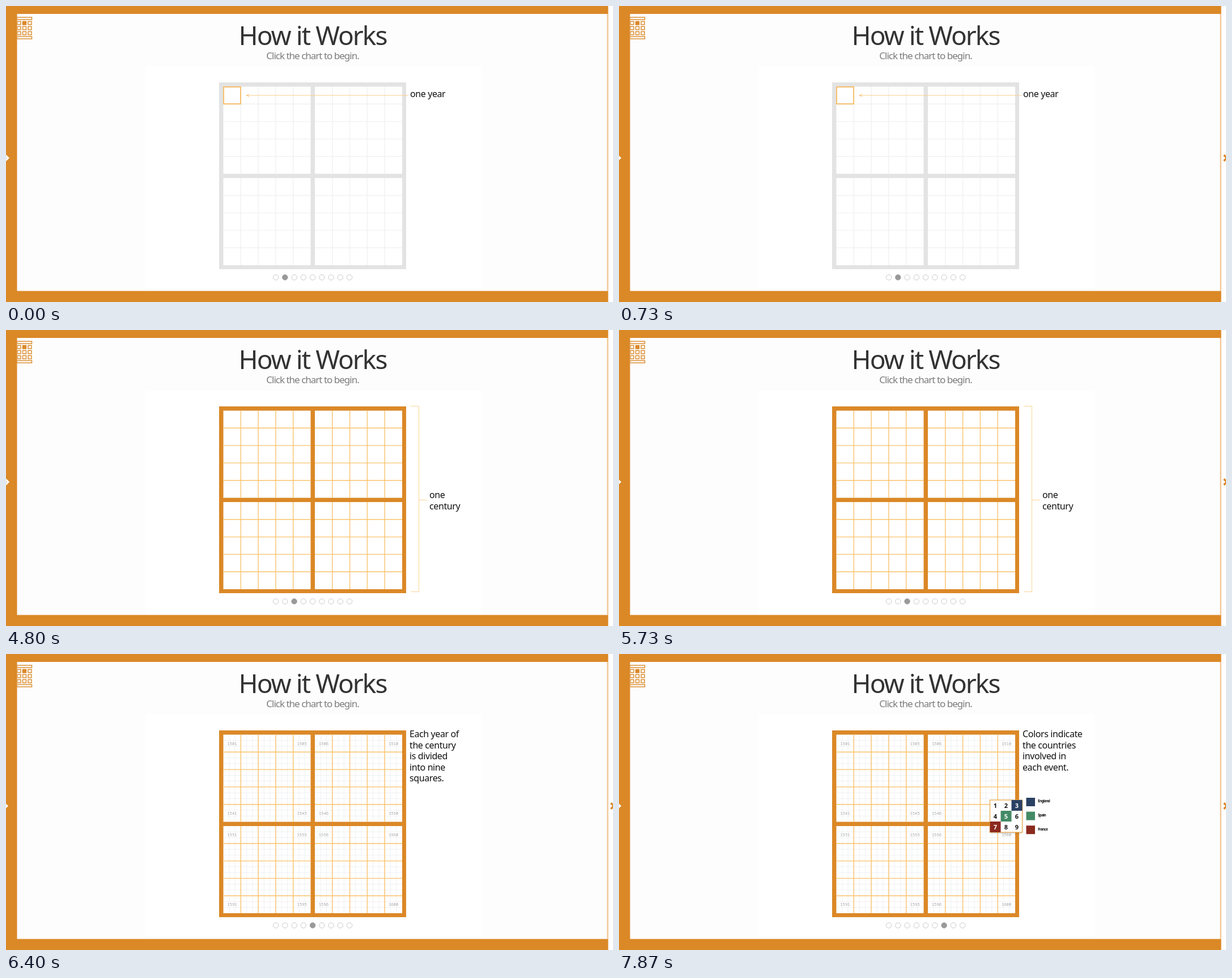
An HTML page with a canvas for the animation above (8000 ms loop, 1071 by 523 pixels).

```html
<!DOCTYPE html>
<html lang="en">
<head>
<meta charset="utf-8">
<title>How it Works</title>
<style>
  html, body { margin: 0; width: 100%; height: 100%; overflow: hidden; background: #fff; }
  canvas { display: block; width: 1071px; height: 523px; }
</style>
</head>
<body>
<canvas id="stage"></canvas>
<script>
const W = 1071, H = 523, LOOP = 8000;
const ORANGE = '#db8827', THIN = '#fac36c', GREY = '#e3e3e3', PALE = '#f1f1f1';
const SANS = '"Noto Sans", "Open Sans", sans-serif';
const MONO = '"Noto Sans Mono", "DejaVu Sans Mono", monospace';
const QUAD = 154, CELL = QUAD / 5;
const QX = [383.5, 545], QY = [142.5, 304];

const canvas = document.getElementById('stage');
const ctx = canvas.getContext('2d');
const dpr = window.devicePixelRatio || 1;
canvas.width = W * dpr;
canvas.height = H * dpr;

function rect(x, y, w, h, color) {
  ctx.fillStyle = color;
  ctx.fillRect(x, y, w, h);
}

function outline(x, y, w, h, color, weight) {
  ctx.strokeStyle = color;
  ctx.lineWidth = weight;
  ctx.strokeRect(x, y, w, h);
}

function path(points, color, weight = 1) {
  ctx.beginPath();
  points.forEach(([x, y]) => ctx.lineTo(x, y));
  ctx.strokeStyle = color;
  ctx.lineWidth = weight;
  ctx.stroke();
}

function text(str, x, y, size, { color = '#111', family = SANS, weight = 400, spacing = 0, align = 'left' } = {}) {
  ctx.font = `${weight} ${size}px ${family}`;
  ctx.letterSpacing = spacing + 'px';
  ctx.textAlign = align;
  ctx.fillStyle = color;
  ctx.fillText(str, x, y);
}

function note(lines, x, y) {
  lines.forEach((line, i) => text(line, x, y + i * 19.6, 16, { spacing: -0.4 }));
}

function chevron(x, color) {
  const y = 268.5;
  ctx.beginPath();
  [[0, -4], [4, 0], [0, 4], [2.5, 6.5], [9, 0], [2.5, -6.5]]
    .forEach(([dx, dy]) => ctx.lineTo(x + dx, y + dy));
  ctx.fillStyle = color;
  ctx.fill();
}

// Both side arrows bounce for about a second, once every five seconds.
function bounce(t) {
  const u = ((t + 330) % 5000) / 1060;
  return u < 1 ? Math.abs(Math.sin(5 * Math.PI * u)) * (1 - 0.8 * u) : 0;
}

function menuIcon() {
  ctx.save();
  ctx.beginPath();
  ctx.rect(19.5, 14, 40, 50);
  ctx.clip();
  outline(19.5, 20, 26, 4, ORANGE, 1.4);
  outline(19.5, 54, 26, 4, ORANGE, 1.4);
  for (let r = 0; r < 3; r++) {
    for (let c = 0; c < 3; c++) {
      outline(20 + c * 9.5, 27.3 + r * 9, 6, 5.6, ORANGE, 1.4);
    }
  }
  rect(29, 27, 7, 6.5, ORANGE);
  ctx.restore();
}

function frame(t) {
  rect(0, 0, W, H, '#fff');
  rect(0, 0, 1062.5, H, ORANGE);
  rect(19.5, 14, 1043, 489.5, '#fdfdfd');
  rect(1060.5, 14, 2, 489.5, '#efc590');
  menuIcon();
  text('How it Works', 541, 69, 46, { color: '#333', spacing: -2, align: 'center' });
  text('Click the chart to begin.', 541, 94, 17, { color: '#7b7b7b', spacing: -1, align: 'center' });
  const b = bounce(t);
  chevron(-5 + 2.7 * b, '#fff');
  chevron(1066 + 7 * b, ORANGE);
}

function chart(border, line, subdivided) {
  rect(376, 135, 330, 330, border);
  for (const x of QX) for (const y of QY) {
    rect(x, y, QUAD, QUAD, '#fff');
    if (subdivided) {
      for (let i = 1; i < 15; i++) {
        const d = i * CELL / 3;
        path([[x + d, y], [x + d, y + QUAD]], '#eff0f2');
        path([[x, y + d], [x + QUAD, y + d]], '#eff0f2');
      }
    }
    for (let i = 1; i < 5; i++) {
      const d = i * CELL;
      path([[x + d, y], [x + d, y + QUAD]], line, 1.4);
      path([[x, y + d], [x + QUAD, y + d]], line, 1.4);
    }
  }
}

function years() {
  QY.forEach((y, qr) => QX.forEach((x, qc) => {
    for (const r of [0, 4]) for (const c of [0, 4]) {
      const year = 1501 + qr * 50 + qc * 5 + r * 10 + c;
      text(year, x + (c + 0.5) * CELL, y + r * CELL + 18, 7.2,
        { color: '#a5a5a5', family: MONO, align: 'center' });
    }
  }));
}

function dots(active) {
  for (let i = 0; i < 9; i++) {
    ctx.beginPath();
    ctx.arc(476 + i * 16.27, 479.5, 4.7, 0, 2 * Math.PI);
    ctx.fillStyle = i === active ? '#999' : '#fff';
    ctx.fill();
    ctx.strokeStyle = i === active ? '#999' : '#c8c8c8';
    ctx.lineWidth = 1;
    ctx.stroke();
  }
}

function magnifier(fills) {
  const x = 654.5, y = 258, s = 19;
  ctx.save();
  ctx.shadowColor = 'rgba(0,0,0,.35)';
  ctx.shadowBlur = 3;
  ctx.shadowOffsetY = 1;
  rect(x, y, s * 3, s * 3, '#fff');
  ctx.restore();
  outline(x, y, s * 3, s * 3, '#f0b35a', 1.4);
  for (let i = 0; i < 9; i++) {
    const cx = x + (i % 3) * s, cy = y + Math.floor(i / 3) * s, fill = fills[i + 1];
    if (fill) rect(cx, cy, s, s, fill);
    text(i + 1, cx + s / 2, cy + 13.7, 11, { color: fill ? '#fff' : '#111', weight: 700, align: 'center' });
  }
}

function oneYear() {
  chart(GREY, PALE);
  outline(384, 143, 30, 30, '#f6b24e', 1.6);
  path([[424, 158], [710, 158]], '#fbcd8b');
  path([[429, 156], [424.5, 158], [429, 160]], '#f9bd69');
  note(['one year'], 713, 161);
}

function century() {
  chart(ORANGE, THIN);
  path([[714, 134.5], [728.5, 134.5], [728.5, 462.5], [714, 462.5]], '#fbd595');
  path([[728.5, 300.5], [743, 300.5]], '#fbd595');
  note(['one', 'century'], 747, 297);
}

function datedChart(lines, subdivided) {
  chart(ORANGE, THIN, subdivided);
  years();
  note(lines, 712, 147);
}

function squareTypes() {
  datedChart(['Each square', 'indicates a', 'type of event.'], true);
  magnifier({});
}

function countries() {
  datedChart(['Colors indicate', 'the countries', 'involved in', 'each event.'], true);
  const key = [['England', 3, '#2b4163'], ['Spain', 5, '#448a66'], ['France', 7, '#8c2a1e']];
  magnifier(Object.fromEntries(key.map(([, n, color]) => [n, color])));
  key.forEach(([name, , color], i) => {
    const y = 254 + i * 24.6;
    rect(718.5, y, 15.5, 15, color);
    text(name, 739, y + 8.3, 6.4, { weight: 700, spacing: -0.7 });
  });
}

// Start time, active dot, drawing.
const slides = [
  [0, 1, oneYear],
  [3670, 3, () => datedChart(['Read the grid', 'from left to', 'right, top to', 'bottom.'])],
  [4670, 2, century],
  [6330, -1, null],
  [6400, 4, () => datedChart(['Each year of', 'the century', 'is divided', 'into nine', 'squares.'], true)],
  [7130, 5, squareTypes],
  [7870, 6, countries]
];

function draw(t) {
  ctx.setTransform(dpr, 0, 0, dpr, 0, 0);
  frame(t);
  const [, dot, paint] = slides.filter(([start]) => start <= t).pop();
  if (!paint) return;
  rect(246, 108, 593, 395, '#fff');
  paint();
  dots(dot);
}

const began = performance.now();
function tick() {
  draw((performance.now() - began) % LOOP);
  requestAnimationFrame(tick);
}
tick();
</script>
</body>
</html>
```
